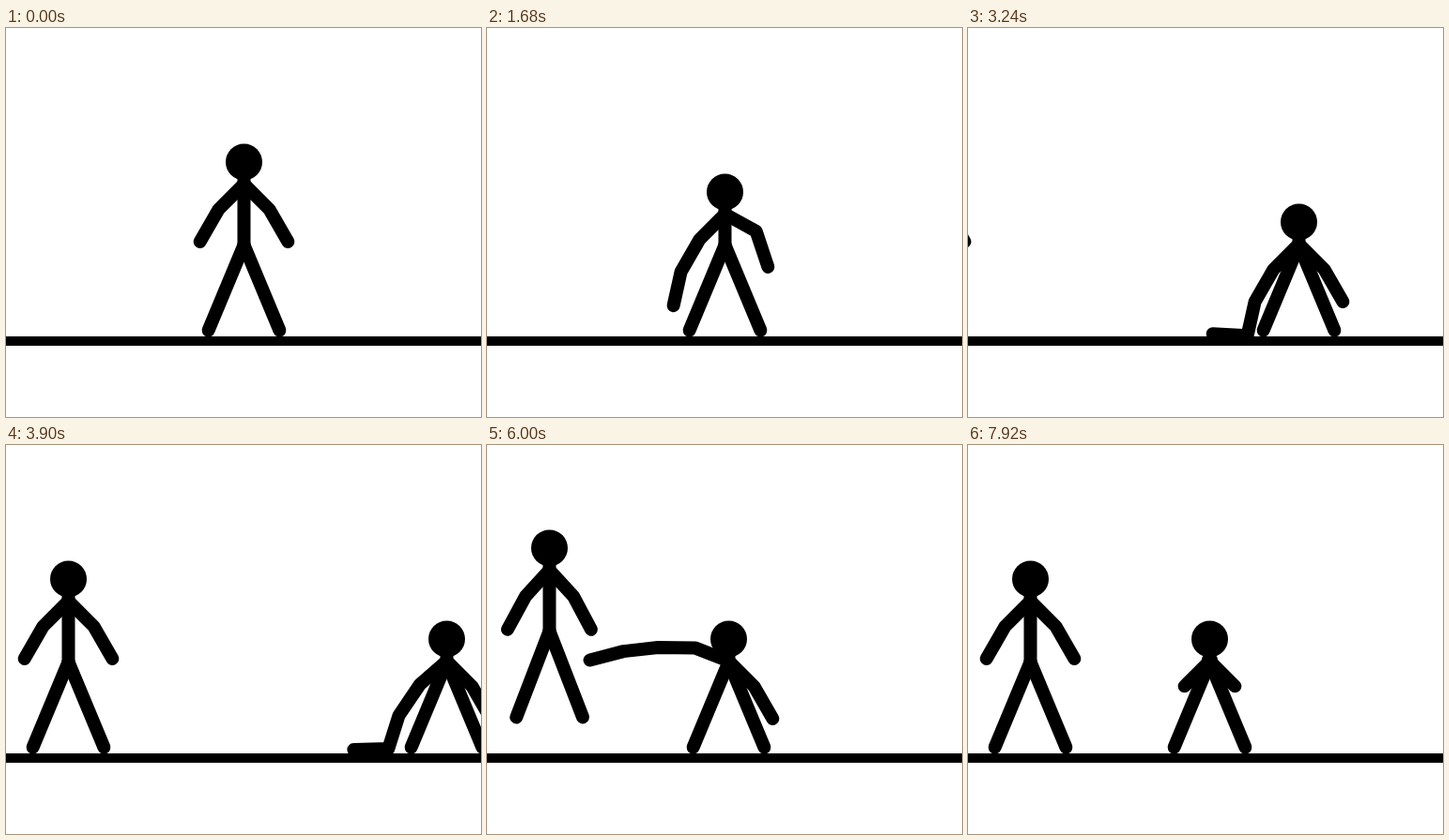
Write an HTML page with a canvas that moves like this. It is 506 px wide and 415 px high and loops after 8 s.

```html
<!DOCTYPE html>
<html lang="en">
<head>
<meta charset="utf-8">
<title>Stick figures</title>
<style>
html, body { margin: 0; width: 100%; height: 100%; overflow: hidden; background: #fff; }
canvas { display: block; }
</style>
</head>
<body>
<canvas id="stage" width="506" height="415"></canvas>
<script>
const ctx = document.getElementById('stage').getContext('2d');
const LOOP = 8000, STEP = 60, GROUND = 329, HIP = 231;
const UPPER = 38, FORE = 40, EXTRA = 37, LEG = 98.6;

// Poses: joint angles in degrees, clockwise from the right.
const LEFT = [135, 120], RIGHT = [45, 60], LEGS = [112.6, 67.4];
const DRAG = [...LEFT, 102.5, 183];
const REACH = [204.4, 192.5, 192.5, 192.5];
const COIL = [139, -62, -224, -406];
const FOLD = [135, -45, -225, -405];
const STAND = [...LEFT, ...RIGHT, ...LEGS];
const STIFF = [99, 100, 78, 86, 91.2, 86.5];

let t = 0;

// Progress from 0 to 1 between two times
const ramp = (a, b) => Math.min(1, Math.max(0, (t - a) / (b - a)));
// The same with a half-size first and last step
const soft = (a, b) => (ramp(a, b - STEP) + ramp(a + STEP, b)) / 2;
const pulse = (a, b, c, d) => ramp(a, b) - ramp(c, d);
const mix = (from, to, u) => from.map((v, i) => v + (to[i] - v) * u);

function limb(x, y, angles, lengths) {
  ctx.beginPath();
  ctx.moveTo(x, y);
  angles.forEach((deg, i) => {
    const r = deg * Math.PI / 180;
    x += lengths[i] * Math.cos(r);
    y += lengths[i] * Math.sin(r);
    ctx.lineTo(x, y);
  });
  ctx.stroke();
}

function body(x, hip, squash, legs) {
  const neck = hip - 65 + squash, head = neck - 23.5;
  ctx.beginPath();
  ctx.arc(x, head, 19.5, 0, Math.PI * 2);
  ctx.fill();
  ctx.beginPath();
  ctx.moveTo(x, head);
  ctx.lineTo(x, hip);
  ctx.stroke();
  legs.forEach(a => limb(x, hip, [a], [LEG]));
  return neck;
}

// Hand goes up to the head, presses it down and comes back.
function press(start, curl, lag) {
  const u = pulse(start, start + 300, start + 540, start + 840);
  return [-80 * u, curl * u ** lag];
}

function pressingArm() {
  const first = press(300, -230, 1), second = press(1620, 130, 1.5);
  const fold = 165 * ramp(7380, 7920);
  return [RIGHT[0] + first[0] + second[0], RIGHT[1] + first[1] + second[1] + fold];
}

function longArm() {
  const lift = soft(3840, 4440);
  let pose = mix(DRAG, REACH, lift);
  pose[3] -= 30 * Math.sin(Math.PI * lift);
  pose = mix(pose, COIL, ramp(5940, 7260));
  pose = mix(pose, FOLD, ramp(7380, 7920));
  const poke = 8 * pulse(5520, 5640, 5640, 5760);
  return pose.map(a => a + poke);
}

function hero(x) {
  const squash = 32 * (ramp(600, 840) + ramp(1920, 2160));
  const neck = body(x, HIP, squash, LEGS);
  limb(x, neck, longArm(),
    [UPPER, FORE, EXTRA * ramp(1140, 1320), EXTRA * ramp(2460, 2820)]);
  limb(x, neck, pressingArm(), [UPPER, FORE]);
}

function friend(x) {
  const jump = t < 6000 ? 0 : Math.max(0, 93 * (1 - ((t - 6366) / 456) ** 2));
  const pose = mix(STAND, STIFF, pulse(5940, 6720, 6780, 7020));
  const flare = 8 * pulse(6840, 7020, 7020, 7260);
  const neck = body(x, HIP - jump, 0, pose.slice(4));
  limb(x, neck, pose.slice(0, 2).map(a => a + flare), [UPPER, FORE]);
  limb(x, neck, pose.slice(2, 4).map(a => a - flare), [UPPER, FORE]);
}

function draw() {
  ctx.fillStyle = '#fff';
  ctx.fillRect(0, 0, 506, 415);
  ctx.fillStyle = ctx.strokeStyle = '#000';
  ctx.lineWidth = 14;
  ctx.lineCap = ctx.lineJoin = 'round';
  ctx.fillRect(0, GROUND, 506, 10);
  const pan = 216 * soft(2880, 3660);
  ctx.save();
  ctx.translate(0.5, 0.5);
  hero(253 + pan - 212 * ramp(4620, 5340));
  friend(pan - 150);
  ctx.restore();
}

const start = performance.now();
function tick() {
  const now = (performance.now() - start) % LOOP;
  t = Math.min(Math.floor(now / STEP) * STEP, 7920);
  draw();
  requestAnimationFrame(tick);
}
tick();
</script>
</body>
</html>
```
